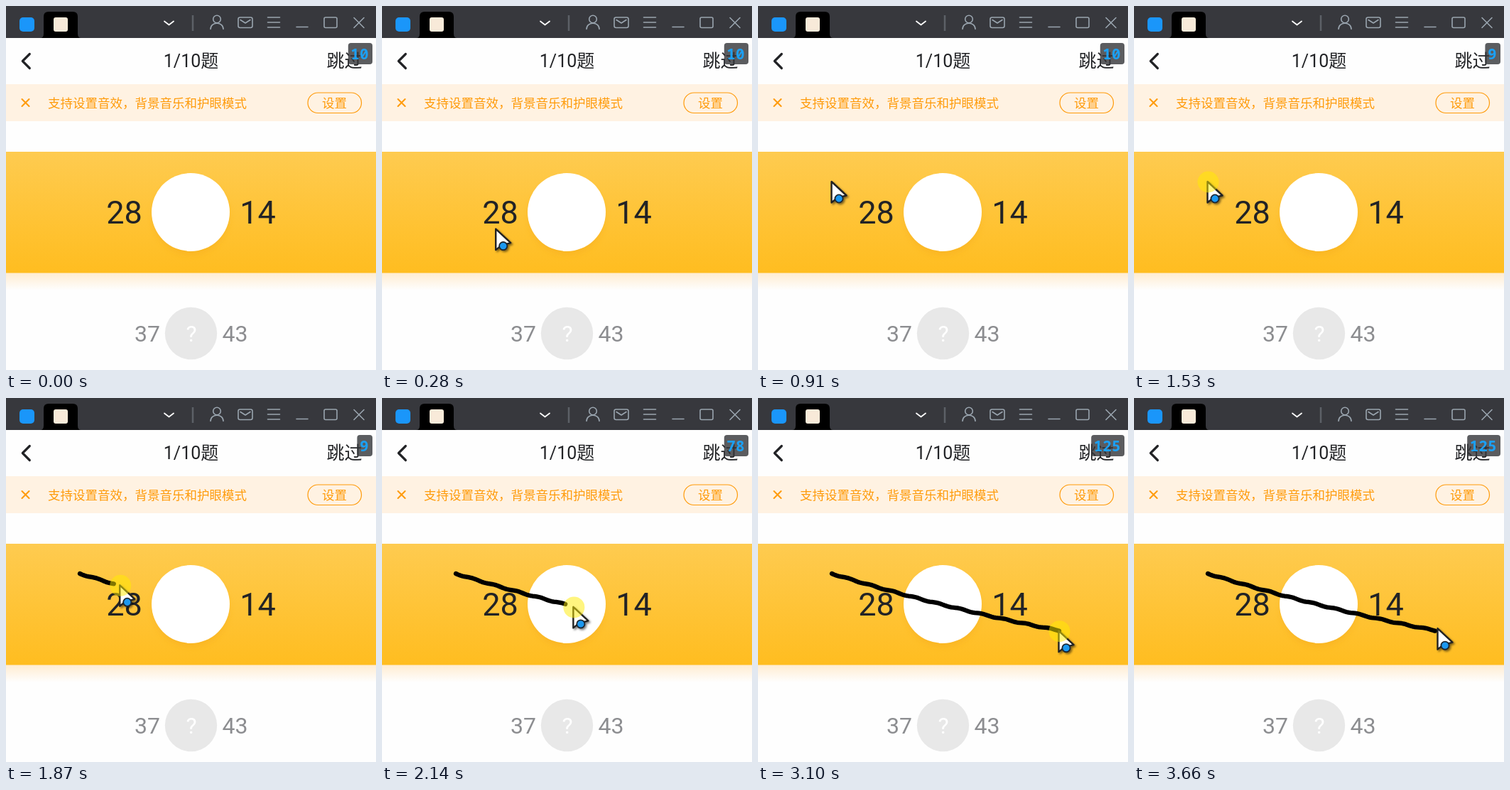
An HTML page that plays this animation: 521 px wide and 512 px high, repeating every 4000 ms.

```html
<!DOCTYPE html>
<html lang="zh">
<head>
<meta charset="utf-8">
<title>1/10题</title>
<style>
  html, body { margin: 0; width: 100%; height: 100%; overflow: hidden; background: #fff; }
  svg { display: block; width: 521px; height: 512px; }
  text { font-family: Roboto, "Noto Sans CJK SC", "Noto Sans CJK", sans-serif; fill: #222326; }
  .line { fill: none; stroke-linecap: round; stroke-linejoin: round; }
  .tools { stroke: #9aa5af; stroke-width: 1.6; }
  .head { font-size: 25px; }
  .notice { font-size: 17.5px; fill: #ff9b0a; }
  .big { font-size: 45px; }
  .small { font-size: 32px; fill: #8c8d90; }
  .mid { text-anchor: middle; }
  #count { font: bold 21px "Noto Sans Mono", monospace; fill: #1ca0f5; text-anchor: end; }
</style>
</head>
<body>
<svg viewBox="0 0 521 512">
  <defs>
    <linearGradient id="gold" x2="0" y2="1">
      <stop stop-color="#fecb50"/><stop offset="1" stop-color="#ffbd20"/>
    </linearGradient>
    <linearGradient id="glow" x2="0" y2="1">
      <stop stop-color="#ffecd0"/><stop offset="1" stop-color="#fefefe"/>
    </linearGradient>
    <filter id="soft" x="-30%" y="-30%" width="160%" height="160%">
      <feGaussianBlur stdDeviation="5"/>
    </filter>
    <filter id="drop" x="-50%" y="-50%" width="200%" height="200%">
      <feDropShadow dx="2" dy="2" stdDeviation="1.5" flood-opacity=".5"/>
    </filter>
  </defs>

  <rect width="521" height="512" fill="#fefefe"/>

  <!-- window bar -->
  <rect width="521" height="45" fill="#37383d"/>
  <path d="M48 45q5 0 5-6V15q0-7 7-7h34q7 0 7 7v24q0 6 5 6z"/>
  <rect x="19" y="16" width="21" height="20" rx="5" fill="#1a96fa"/>
  <rect x="67" y="16" width="20" height="20" rx="3" fill="#f8ead9"/>
  <path class="line" d="M223 21.500l6.500 5 6.500-5" stroke="#fff" stroke-width="1.800"/>
  <path d="M263 13v22" stroke="#5c6067" stroke-width="2.500"/>
  <g class="line tools" transform="translate(0 -.5)">
    <circle cx="297" cy="19" r="5.300"/>
    <path d="M288 33c0-11 18-11 18 0"/>
    <rect x="327" y="16.500" width="20" height="14.500" rx="2.500"/>
    <path d="M330 20l7 4.500 7-4.500"/>
    <path d="M368.500 16.500h17M368.500 23.500h17M368.500 30.500h17M409 30h16"/>
    <rect x="448" y="16.500" width="18" height="14.500" rx="2"/>
    <path d="M490 17l14 14M504 17l-14 14"/>
  </g>

  <!-- page header -->
  <path class="line" d="M33.300 67.500l-10 10 10 10" stroke="#222326" stroke-width="3.200"/>
  <text class="head mid" x="260.500" y="86">1/10题</text>
  <text class="head" x="451.500" y="86">跳过</text>

  <!-- notice -->
  <rect y="110" width="521" height="52" fill="#fff2e2"/>
  <path class="line" d="M22.500 131l10 10M32.500 131l-10 10" stroke="#ff9b0a" stroke-width="2.100"/>
  <text class="notice" x="59" y="142.500">支持设置音效，背景音乐和护眼模式</text>
  <rect x="425" y="122" width="75.500" height="28.500" rx="14.250" fill="none" stroke="#ff9b0a" stroke-width="1.200"/>
  <text class="notice mid" x="462.500" y="142.500">设置</text>

  <!-- current question -->
  <rect y="375" width="521" height="25" fill="url(#glow)"/>
  <rect y="205" width="521" height="170.500" fill="url(#gold)"/>
  <circle cx="260" cy="296.500" r="53" fill="#f3a81a" opacity=".45" filter="url(#soft)"/>
  <circle cx="260" cy="290" r="55" fill="#fff"/>
  <text class="big mid" x="166.500" y="305.500">28</text>
  <text class="big mid" x="354.500" y="305.500">14</text>

  <!-- next question -->
  <circle cx="260.500" cy="460.500" r="36.700" fill="#e8e8e8"/>
  <text class="small mid" x="199" y="472">37</text>
  <text class="small mid" x="322.500" y="472">43</text>
  <text class="mid" x="261" y="471.500" font-size="32" style="fill:#fff">?</text>

  <polyline id="ink" class="line" stroke="#000" stroke-width="6.300"/>
  <g id="cursor">
    <g filter="url(#drop)" transform="translate(-1.500 -1)">
      <path d="M1 1V30.500L9 24 22 20.500z" fill="#fff" stroke="#222" stroke-width="2.400" stroke-linejoin="round"/>
      <circle cx="11.500" cy="25" r="5.600" fill="#1a98f0" stroke="#1c2630" stroke-width="1.800"/>
    </g>
    <circle id="press" cx=".5" cy=".5" r="15" fill="#ffeb00" opacity=".5"/>
  </g>

  <rect id="badge" y="52" height="30" rx="4" fill="#323438" fill-opacity=".8"/>
  <text id="count" x="510.500" y="74.500"></text>
</svg>
<script>
const LOOP = 4000, TICK = 68.6;
const PRESS = 22, RELEASE = 47, RATE_EVERY = 15;
const RATES = ['10', '9', '78', '125'];
const LEFT = 104, TOP = 247, WIDTH = 320, DROP = 80;

const el = id => document.getElementById(id);
const show = (id, on) => el(id).style.display = on ? '' : 'none';
const ramp = (from, to, k) => Math.min(1, Math.max(0, (k - from) / (to - from)));
const smooth = u => u * u * (3 - 2 * u);

// The drawn line: slightly bowed, with a shaky hand.
const dragX = k => LEFT + WIDTH * smooth(ramp(22.6, 39, k));
function lineY(x) {
  const u = (x - LEFT) / WIDTH;
  return TOP + DROP * u + 19 * u * (1 - u) + 0.7 * Math.sin((x - LEFT) / 5);
}

function tip(k) {
  if (k < PRESS) {
    const rest = 1 - ramp(1, 10.6, k);
    return [LEFT + 120 * rest ** 2, TOP + 205 * rest ** 3];
  }
  const x = dragX(k), away = ramp(49, 53, k);
  return [x + 4 * away, lineY(x) - 3.5 * away];
}

function inkPoints(k) {
  const end = dragX(k - 0.4), points = [];
  for (let x = LEFT; x < end; x += 3) points.push([x, lineY(x)]);
  points.push([end, lineY(end)]);
  return points.join(' ');
}

function draw(k) {
  const [x, y] = tip(k);
  el('cursor').setAttribute('transform', `translate(${x} ${y})`);
  show('cursor', k > 0);
  show('press', k >= PRESS && k < RELEASE);
  el('ink').setAttribute('points', k > PRESS ? inkPoints(k) : '');

  const rate = RATES[Math.floor(k / RATE_EVERY)];
  const width = 9 + 12.6 * rate.length;
  el('count').textContent = rate;
  el('badge').setAttribute('x', 516 - width);
  el('badge').setAttribute('width', width);
}

let shown = -1;
function frame() {
  const k = Math.floor(performance.now() % LOOP / TICK);
  if (k !== shown) draw(shown = k);
  requestAnimationFrame(frame);
}
frame();
</script>
</body>
</html>
```
